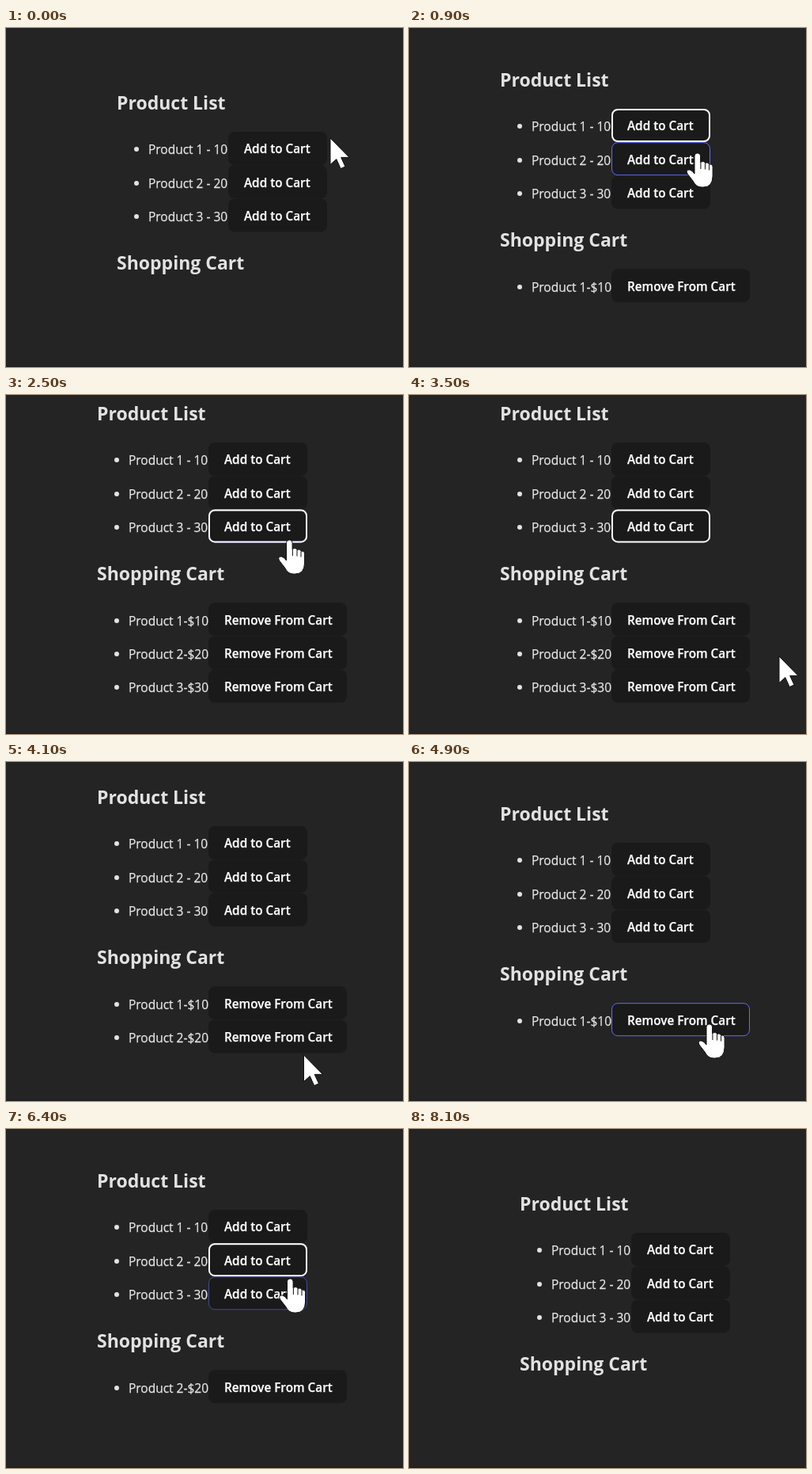
An HTML page for the animation above (8200 ms loop, 502 px wide and 428 px high).

```html
<!DOCTYPE html>
<html lang="en">
<head>
<meta charset="utf-8">
<title>Shopping cart demo</title>
<style>
  html, body { margin: 0; width: 100%; height: 100%; overflow: hidden; background: #242424; }
  svg { display: block; width: 502px; height: 428px; background: #242424; }
  text {
    font-family: "Open Sans", "Noto Sans", sans-serif; font-size: 15.5px;
    fill: #e6e6e6; stroke: #e6e6e6; stroke-width: .25; white-space: pre;
  }
  .title { font-size: 23px; font-weight: 700; fill: #e2e2e2; stroke: none; }
  .label { font-size: 15.3px; font-weight: 600; fill: #fff; stroke: #fff; }
  .bullet { fill: #e2e2e2; }
  .button { fill: #1a1a1a; }
  .hover { fill: none; stroke: #646cff; }
  .focus { fill: none; stroke: #fff; stroke-width: 2; }
  .pointer { fill: #fff; stroke: #111; stroke-width: 1; stroke-linejoin: round; }
  .crease { fill: none; stroke: #222; stroke-width: 1.1; }
</style>
</head>
<body>
<svg id="stage" viewBox="0 0 502 428"></svg>
<script>
const LOOP = 8200, STEP = 100, TRAVEL = 400, FADE = 250;
const ROW = 42.2, HEIGHT = 42;

// Where the pointer stops: arrival time, x, y
const stops = [
  [0, 410, 139], [500, 365, 158], [1300, 404, 317], [1700, 366, 169],
  [2200, 358.5, 183], [3400, 468, 330], [3900, 376.5, 370], [4500, 379, 352],
  [4900, 380, 331], [5700, 446, 300], [6200, 359.5, 189], [6800, 390, 320], [7700, 400, -45]
];
const clicks = [700, 1800, 2400, 4000, 4700, 5300, 6400, 7300];

const ARROW = 'M0 0V33.5L7.8 26.6L13.2 38.6L19 36L13.7 24.4H24Z';
const HAND = 'M-4 25V3.7a3.8 3.8 0 0 1 7.6 0V11.5q4.5-2.3 6 1q4-1.5 5 1.7q4-.7 4.5 3V29' +
  'q-.3 14-12 14H5q-7 0-11-8L-13 26q-2.5-5.5 3-5q3.5 1 6 5Z';
const CREASES = 'M3.9 11v9M9.5 12.5v8M14.5 14.5v7';

const stage = document.getElementById('stage');
const clamp = v => Math.max(0, Math.min(1, v));

function pointerAt(t) {
  let [, x, y] = stops[0];
  stops.slice(1).forEach(([arrive, toX, toY], i) => {
    const leave = Math.max(stops[i][0], arrive - TRAVEL);
    const p = clamp((t - leave) / (arrive - leave)), e = p * p * (3 - 2 * p);
    x += (toX - x) * e;
    y += (toY - y) * e;
  });
  return { x, y };
}

// The page is centred, so it moves up as the cart grows.
function layout(cart) {
  const count = cart.length;
  const left = count ? 115 : 140;
  const dy = count && -8 - 21 * count;
  const makeRow = (kind, top, w, label, dash) => (n, i) => ({
    id: kind + n, kind, n, left, x: left + 141, y: top + dy + i * ROW, w,
    label, item: `Product ${n}${dash}${n}0`
  });
  const rows = [
    ...[1, 2, 3].map(makeRow('add', 131, 125, 'Add to Cart', ' - ')),
    ...cart.map(makeRow('remove', 333.2, 175, 'Remove From Cart', '-$'))
  ];
  return { left, dy, rows };
}

// Replays the session: clicks change the cart, the press before a click moves the focus.
function replay() {
  const frames = [];
  let cart = [], focus = '', glow = {}, over;
  for (let t = 0; t < LOOP; t += STEP) {
    const point = pointerAt(t);
    if (over && clicks.includes(t)) {
      const { kind, n } = over;
      cart = kind === 'add' ? [...cart, n] : cart.filter(m => m !== n);
    }
    const page = layout(cart);
    over = page.rows.find(({ x, y, w }) =>
      point.x >= x && point.x < x + w && point.y >= y && point.y < y + HEIGHT);
    if (over && clicks.includes(t + STEP)) focus = over.id;
    if (!page.rows.some(row => row.id === focus)) focus = '';
    glow = Object.fromEntries(page.rows.map(row =>
      [row.id, clamp((glow[row.id] || 0) + (row === over ? STEP : -STEP) / FADE)]));
    frames.push({ page, focus, glow, point, hand: Boolean(over) });
  }
  return frames;
}

const text = (x, y, value, kind = '') => `<text class="${kind}" x="${x}" y="${y}">${value}</text>`;

const box = ({ x, y, w }, inset, kind, opacity = 1) =>
  `<rect class="${kind}" x="${x + inset}" y="${y + inset}" width="${w - 2 * inset}"
    height="${HEIGHT - 2 * inset}" rx="${8 - inset}" opacity="${opacity}"/>`;

function drawRow(row, focused, glow) {
  const line = Math.ceil(row.y); // text sits on whole pixels
  return `<circle class="bullet" cx="${row.left + 25}" cy="${line + 22}" r="3"/>` +
    text(row.left + 40, line + 28, row.item) +
    box(row, 0, 'button') +
    box(row, 0.5, 'hover', Math.sin(glow * Math.PI / 2)) +
    (focused ? box(row, 1, 'focus') : '') +
    text(row.x + 20, line + 27, row.label, 'label');
}

function draw({ page, focus, glow, point, hand }) {
  const { left, dy, rows } = page;
  const shape = hand
    ? `<path class="pointer" d="${HAND}"/><path class="crease" d="${CREASES}"/>`
    : `<path class="pointer" d="${ARROW}"/>`;
  stage.innerHTML =
    '<rect y="427" width="502" height="1" fill="#1d1d1d"/>' +
    text(left, 103 + dy, 'Product List', 'title') +
    text(left, 305 + dy, 'Shopping Cart', 'title') +
    rows.map(row => drawRow(row, row.id === focus, glow[row.id])).join('') +
    `<g transform="translate(${point.x} ${point.y})">${shape}</g>`;
}

const frames = replay();
const start = performance.now();
let shown = -1;
function tick() {
  const index = Math.floor(((performance.now() - start) % LOOP) / STEP);
  if (index !== shown) draw(frames[shown = index]);
  requestAnimationFrame(tick);
}
tick();
</script>
</body>
</html>
```
